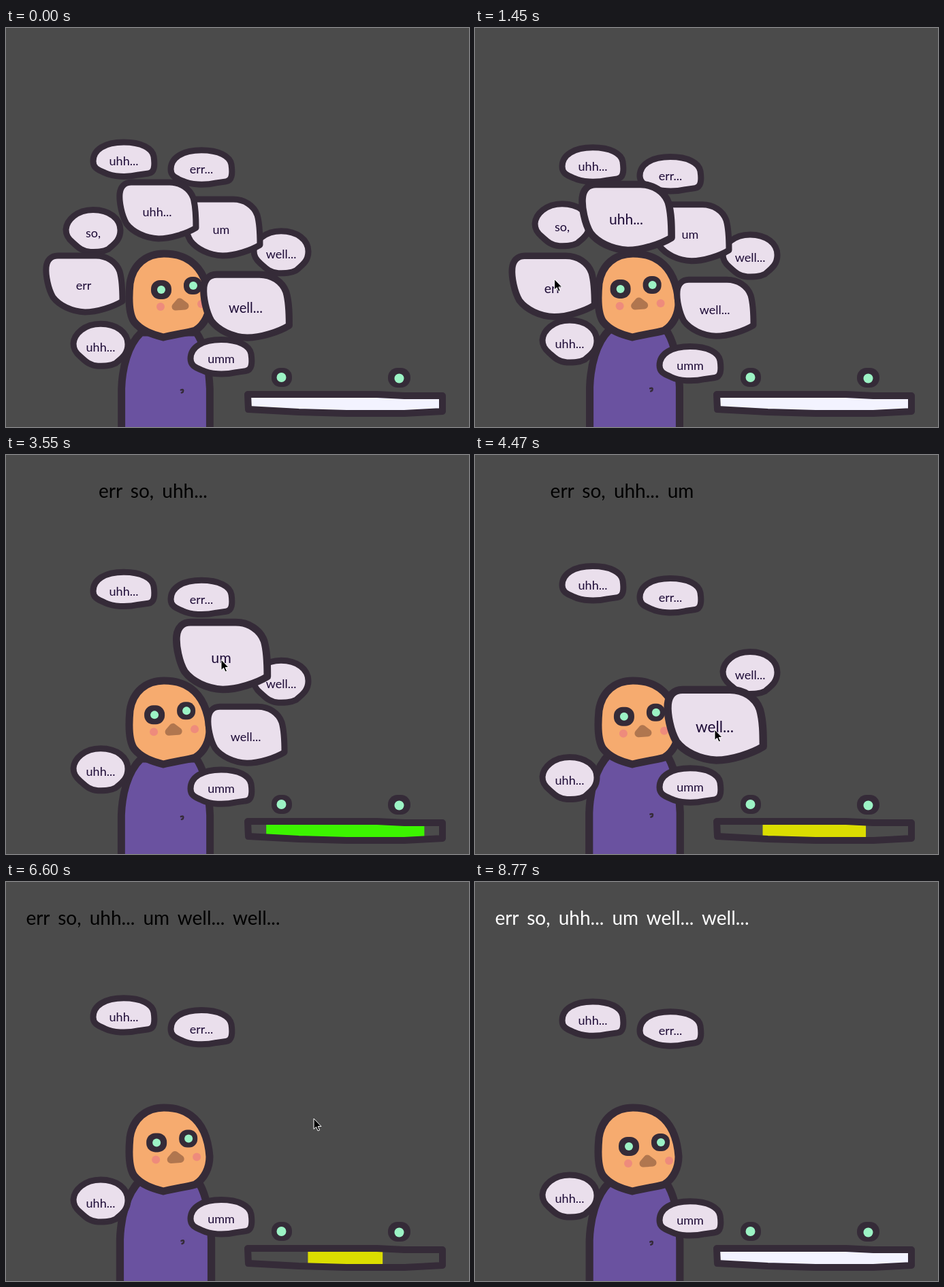
Recreate the animation shown at these times as an HTML page. Size 680x587 px, loop 8.87 s.

```html
<!DOCTYPE html>
<html lang="en">
<head>
<meta charset="utf-8">
<title>Mumbling</title>
<style>
  html, body { margin: 0; width: 100%; height: 100%; overflow: hidden; background: #4b4b4b; }
  svg { display: block; width: 680px; height: 587px; }
  .ink { stroke: #352b38; stroke-linejoin: round; stroke-linecap: round; }
  .dark { fill: #352b38; }
  .glow { fill: #9cf3c5; }
  .bubble { fill: #eadfec; stroke-width: 9; }
  text { font-family: Lato, "Open Sans", sans-serif; text-anchor: middle; }
  .word { font-size: 18px; fill: #1d0b36; }
  #speech { font-size: 28px; word-spacing: 5px; }
</style>
</head>
<body>
<svg viewBox="0 0 680 587">
  <defs>
    <path id="big" d="M-38-41H18C34-41 48-32 53-18C57-4 57 12 57 26C44 34 20 42 2 42C-18 41-36 32-45 20C-52 8-56-12-55-24C-54-34-48-41-38-41Z"/>
    <path id="flat" d="M-45 3C-45-14-28-25 0-25C26-25 42-16 44-4C46 10 45 20 36 21L22 23C4 27-16 26-28 20C-40 15-45 12-45 3Z"/>
    <path id="round" d="M-40-2C-39-16-24-31 0-31C24-31 40-18 40-1C40 14 30 20 22 27C14 31 6 31-4 31C-18 30-24 22-30 17C-37 11-40 6-40-2Z"/>
    <path id="tray" d="M355 539H545L585 541H641V564L585 567H500L430 565L356 561Z"/>
    <clipPath id="inTray"><use href="#tray"/></clipPath>
  </defs>

  <text id="speech" x="216" y="63"></text>

  <g id="body">
    <path class="ink" fill="#6a52a0" stroke-width="11" d="M169 660V530C170 500 178 466 198 447H280C292 464 298 490 300 530V660"/>
    <path class="ink" fill="none" stroke-width="2.5" d="M257 532Q262 530 260 535L258 536"/>
  </g>
  <path class="ink" fill="#f6ab6f" stroke-width="11"
    d="M232 332C206 332 186 348 182 376C180 398 180 420 188 432C199 446 216 451 231 455C246 451 264 449 278 445C292 436 299 420 299 404C297 376 289 356 271 343C260 335 246 332 232 332Z"/>
  <g id="face">
    <rect class="dark" x="-15" y="-14" width="30" height="28" rx="13"/>
    <circle class="glow" r="6"/>
    <rect class="dark" x="33" y="-19" width="27" height="26" rx="12"/>
    <circle class="glow" cx="47" cy="-6" r="6"/>
    <g fill="#ee8b7c"><circle cx="-1" cy="25" r="6"/><circle cx="59" cy="21" r="6"/></g>
    <path d="M21 25L27 18L35 24Z" fill="#b0764f" stroke="#b0764f" stroke-width="11" stroke-linejoin="round"/>
  </g>

  <rect id="fill" y="535" height="35" clip-path="url(#inTray)"/>
  <use href="#tray" class="ink" fill="none" stroke-width="10"/>
  <rect class="dark" x="390" y="500" width="30" height="28" rx="13"/>
  <circle class="glow" cx="404.5" cy="514" r="7"/>
  <rect class="dark" x="561" y="500" width="33" height="29" rx="14"/>
  <circle class="glow" cx="577.5" cy="515.5" r="7"/>

  <g id="bubbles"></g>
  <path id="cursor" d="M0 0V15.5L3.6 12.3L6 18L8.6 17L6.2 11.5H11Z" fill="#000" stroke="#fff"/>
</svg>
<script>
const LOOP = 8870, BOB = 1857, DRAIN = 0.52, FIRST_CLICK = 1875, HOVER_LAG = 80;
const $ = id => document.getElementById(id);
const clamp = v => Math.max(0, Math.min(1, v));
const wave = (t, deg) => Math.cos(2 * Math.PI * (t / BOB - deg / 360));

function bubble(shape, word, x, y, phase) {
  $('bubbles').insertAdjacentHTML('beforeend',
    `<g><use href="#${shape}" class="ink bubble"/><text class="word" y="9.5">${word}</text></g>`);
  return { word, x, y, phase, node: $('bubbles').lastElementChild, hovers: [], pop: Infinity };
}

// Later bubbles lie on top.
const so = bubble('round', 'so,', 128, 291, 20);
const well = bubble('round', 'well...', 404, 327, 290);
const idle = [
  bubble('round', 'uhh...', 139, 469, 110),
  bubble('flat', 'uhh...', 173, 193, 270),
  bubble('flat', 'err...', 287, 208, 247),
  bubble('flat', 'umm', 316, 487, 245),
];
const um = bubble('big', 'um', 316, 301, 190);
const uhh = bubble('big', 'uhh...', 222, 272, 240);
const err = bubble('big', 'err', 114, 372, 300);
const bigWell = bubble('big', 'well...', 352, 404, 305);
const bubbles = [so, well, ...idle, um, uhh, err, bigWell];

// The cursor sets off for each target at the given time; leaving a bubble after FIRST_CLICK means it was clicked.
const outside = { x: 755, y: 418 }, rest = { x: 452, y: 348 }, below = { x: 667, y: 596 };
const route = [[-200, bigWell], [560, um], [950, uhh], [1290, err], [1875, so], [2690, uhh],
  [3240, um], [3600, bigWell], [4655, well], [5440, rest], [7600, below]];

const spoken = [];
route.forEach(([start, target], i) => {
  if (!target.word) return;
  const end = route[i + 1][0];
  target.hovers.push([start + HOVER_LAG, end + HOVER_LAG]);
  if (end >= FIRST_CLICK) {
    target.pop = end;
    spoken.push(target);
  }
});
const timeUp = spoken[spoken.length - 1].pop + 1000 / DRAIN;

function cursorAt(t) {
  if (t < HOVER_LAG) return outside;
  const i = route.filter(([start]) => start <= t).length - 1;
  const [start, to] = route[i], from = i ? route[i - 1][1] : to;
  const travel = 80 + Math.hypot(to.x - from.x, to.y - from.y);
  const away = (1 - clamp((t - start) / travel)) ** 3;
  return { x: to.x + (from.x - to.x) * away, y: to.y + (from.y - to.y) * away };
}

function bubbleScale({ hovers, pop }, t) {
  let grow = 0;
  for (const [enter, leave] of hovers)
    grow += clamp((t - enter) / 250) - clamp((t - leave) / 250);
  return (1 + 0.25 * grow) * (1 - clamp((t - pop + 55) / 180));
}

function drawBar(t, last) {
  const waiting = !last || t >= timeUp;
  const left = waiting ? 1 : clamp(1 - DRAIN * (t - last.pop) / 1000);
  const color = waiting ? '#f3f3ff' : left > 0.67 ? '#3cf400' : left > 0.33 ? '#dbdd00' : '#e3201b';
  $('fill').setAttribute('x', 498.3 - 138.5 * left);
  $('fill').setAttribute('width', 277 * left);
  $('fill').setAttribute('fill', color);
}

function draw(t) {
  for (const b of bubbles) {
    const scale = bubbleScale(b, t);
    b.node.setAttribute('transform', `translate(${b.x} ${b.y + 8 * wave(t, b.phase)}) scale(${scale})`);
    b.node.style.display = scale > 0 ? '' : 'none';
  }
  const breath = wave(t, 190);
  $('body').setAttribute('transform',
    `translate(234.5 620) scale(${1.007 + 0.017 * breath} ${1.02 + 0.027 * breath}) translate(-234.5 -620)`);

  const { x, y } = cursorAt(t);
  $('cursor').setAttribute('transform', `translate(${x} ${y})`);
  $('face').setAttribute('transform', `translate(${211 + 0.0225 * x} ${375.6 + 0.0225 * y})`);

  const said = spoken.filter(b => b.pop <= t);
  const shade = 255 * clamp((t - timeUp) / 500);
  $('speech').textContent = said.map(b => b.word).join(' ');
  $('speech').setAttribute('fill', `rgb(${shade},${shade},${shade})`);
  drawBar(t, said.pop());
}

const begin = performance.now();
function tick() {
  draw((performance.now() - begin) % LOOP);
  requestAnimationFrame(tick);
}
tick();
</script>
</body>
</html>
```
